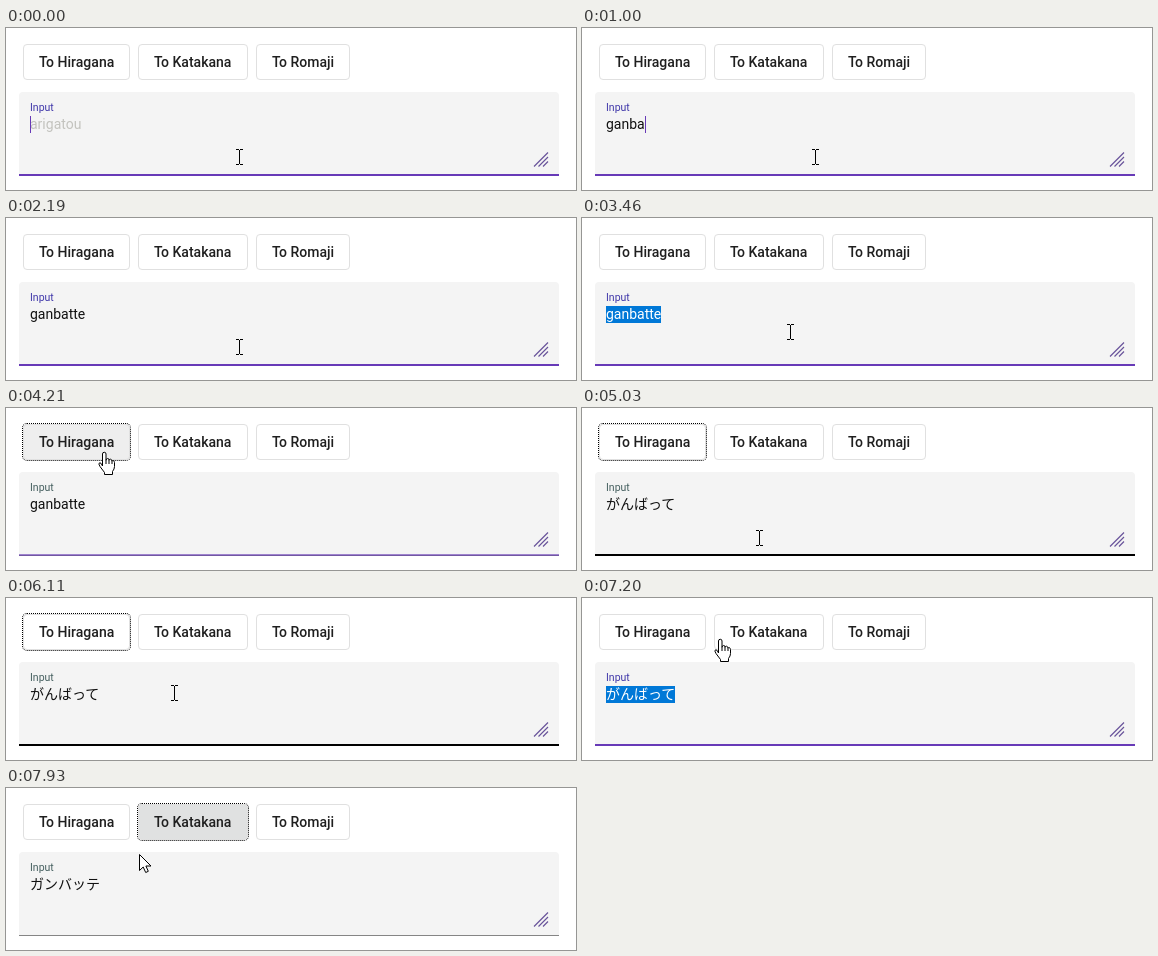
These frames come from a looping animation (570 px wide and 162 px high, 8 s). An HTML page:

```html
<!DOCTYPE html>
<html lang="ja">
<head>
<meta charset="utf-8">
<title>Kana converter</title>
<style>
  html, body { margin: 0; width: 100%; height: 100%; overflow: hidden; background: #fff; }
  body { position: relative; font: 14px Roboto, "Noto Sans CJK JP", "Noto Sans CJK", sans-serif; color: #000; }
  body *, svg { position: absolute; box-sizing: border-box; white-space: pre; }
  .button {
    top: 16px; height: 36px; padding-left: 15px; border: 1px solid #e0e0e0; border-radius: 4px;
    font-weight: 500; line-height: 34px; color: #1f1f1f;
  }
  .focused { outline: 1px dotted #000; }
  #field { left: 13px; top: 64px; width: 540px; height: 84px; background: #f4f4f4; border-radius: 4px 4px 0 0; }
  #field > .line { left: 0; bottom: 0; width: 100%; height: 2px; }
  #label { left: 11px; top: 9px; font-size: 10.5px; line-height: 13px; }
  #text, #selection { left: 11px; top: 24px; height: 17px; line-height: 17px; }
  #caret { left: 100%; top: 0; width: 1px; height: 17px; background: #673ab7; }
  #selection { overflow: hidden; background: #0078d7; color: #fff; }
  #selection span { top: 0; }
  svg { left: 0; top: 0; }
</style>
</head>
<body>
<div class="button" style="left:17px;width:107px">To Hiragana</div>
<div class="button" style="left:132px;width:110px">To Katakana</div>
<div class="button" style="left:250px;width:94px">To Romaji</div>
<div id="field">
  <div id="label">Input</div>
  <div id="text"><span id="value" style="position:static"></span><i id="caret"></i></div>
  <div id="selection"><span></span></div>
  <div class="line" style="height:1px;background:#858585"></div>
  <div class="line" id="hoverLine" style="background:#000"></div>
  <div class="line" id="focusLine" style="background:#673ab7"></div>
</div>
<svg width="570" height="162" fill="none">
  <path d="M528 138.5L542 124.5M532.5 138.5L542 129M537 138.5L542 133.5" stroke="#69549b" stroke-width="1.2"/>
  <g id="pointer" stroke="#000">
    <path id="beam" d="M-3 -7.5H0M1 -7.5H4M.5 -7V7M-3 7.5H0M1 7.5H4"/>
    <path id="hand" fill="#fff" transform="translate(-6 0)" d="M4.5 14V2A1.75 1.75 0 0 1 8 2V8.5Q8 6.5 9.7 6.5T11 8.5Q11.3 7 12.6 7.2T14 9.3Q14.3 8.3 15.3 8.6T16.5 10.5V14.5Q16.5 17 14.5 19.5V22.5H6.5V20.5L2 14.5Q0 11.5 1.5 10.8T4.5 14ZM8 8.5V12M11 8.5V12M14 9.3V12"/>
    <path id="arrow" fill="#fff" d="M.5 .5V16.5L4.2 13L6.7 18.5L9.3 17.3L6.9 12H12Z"/>
  </g>
</svg>
<script>
const LOOP = 8000;
const PRESS_HIRAGANA = 4140, CLICK_FIELD = 6180, PRESS_KATAKANA = 7730;
const $ = id => document.getElementById(id);
const [hiragana, katakana] = document.querySelectorAll('.button');
const selectedText = $('selection').firstElementChild;

const values = [
  [0, ''], [70, 'g'], [200, 'ga'], [330, 'gan'], [800, 'ganb'], [1000, 'ganba'],
  [1200, 'ganbat'], [1390, 'ganbatt'], [1590, 'ganbatte'], [4270, 'がんばって'], [7860, 'ガンバッテ']
];
// Pointer bursts: start, end, number of steps
const bursts = [[3460, 3940, 8], [4140, 4890, 12], [5370, 5840, 7], [6040, 6440, 6], [6850, 7470, 10], [7730, 7930, 4]];
// Pointer path: time, x, y
const path = [
  [0, 233, 129], [3391, 233, 129], [3460, 208, 114], [3940, 98, 44], [4340, 98, 44], [4680, 170, 128],
  [4890, 177, 130], [5300, 177, 130], [5840, 173, 100], [6040, 170, 97], [6110, 168, 95], [6180, 168, 95],
  [6440, 32, 78], [6781, 32, 78], [7200, 139, 41], [7470, 152, 41], [7780, 152, 41], [7930, 133, 66]
];

const ramp = (t, from, to) => Math.min(1, Math.max(0, (t - from) / (to - from)));
const within = (t, from, to) => t >= from && t < to;

function pointerTime(t) {
  const burst = bursts.findLast(b => t >= b[0]);
  if (!burst) return 0;
  const [start, end, count] = burst, step = (end - start) / (count - 1);
  return Math.min(end, start + Math.floor((t - start) / step + 0.2) * step);
}

function pointerAt(t) {
  const i = path.findLastIndex(p => p[0] <= t);
  const a = path[i], b = path[i + 1] || a;
  const k = a === b ? 0 : ramp(t, a[0], b[0]);
  return [1, 2].map(axis => Math.round(a[axis] + (b[axis] - a[axis]) * k));
}

function pointerShape(x, y) {
  if (y > 72) return 'beam';
  const overButton = y >= 16 && y < 52 && (within(x, 17, 124) || within(x, 132, 242));
  return overButton ? 'hand' : 'arrow';
}

// Offset and width of the selected part of the text
function selectionAt(t, x, width) {
  if (within(t, 2470, PRESS_HIRAGANA)) return [0, width];
  if (!within(t, CLICK_FIELD, PRESS_KATAKANA)) return [0, 0];
  const start = t >= 6440 ? 0 : Math.min(width, Math.max(0, Math.round((x - 24) / 14) * 14));
  return [start, width - start];
}

function shade(button, t, press, hover) {
  const ripple = 0.12 * ramp(t, press, press + 130) * (1 - ramp(t, press + 270, press + 500));
  button.style.backgroundColor = `rgba(0,10,10,${Math.max(ripple, hover)})`;
}

function draw(t) {
  const [x, y] = pointerAt(pointerTime(t));
  $('pointer').setAttribute('transform', `translate(${x} ${y})`);
  const shape = pointerShape(x, y);
  for (const name of ['beam', 'hand', 'arrow']) $(name).style.display = name === shape ? '' : 'none';

  const value = values.findLast(v => t >= v[0])[1];
  $('value').textContent = value || 'arigatou';
  $('value').style.color = value ? '#111' : '#c3c3be';
  const width = $('value').getBoundingClientRect().width;
  const [start, length] = selectionAt(t, x, width);
  selectedText.textContent = value;
  selectedText.style.left = -start + 'px';
  $('selection').style.left = 11 + start + 'px';
  $('selection').style.width = length + 'px';

  const focus = t < PRESS_HIRAGANA || within(t, CLICK_FIELD, PRESS_KATAKANA);
  const blinkedOff = within(t, 600, 800) || within(t, 2190, 2470);
  $('caret').style.display = focus && !length && !blinkedOff ? '' : 'none';
  $('caret').style.left = value ? '100%' : '0';
  $('label').style.color = focus ? '#4038aa' : '#466060';
  $('focusLine').style.opacity = focus ? 1 : 1 - ramp(t, ...(t < CLICK_FIELD ? [PRESS_HIRAGANA, 4320] : [PRESS_KATAKANA, 7910]));
  $('hoverLine').style.opacity = t < CLICK_FIELD ? ramp(t, 4430, 5030) : 0;

  hiragana.classList.toggle('focused', within(t, PRESS_HIRAGANA, CLICK_FIELD));
  katakana.classList.toggle('focused', t >= PRESS_KATAKANA);
  shade(hiragana, t, PRESS_HIRAGANA, 0);
  shade(katakana, t, PRESS_KATAKANA, 0.04 * ramp(t, 7200, 7470));
}

const begin = performance.now();
function tick() {
  draw((performance.now() - begin) % LOOP);
  requestAnimationFrame(tick);
}
tick();
</script>
</body>
</html>
```
